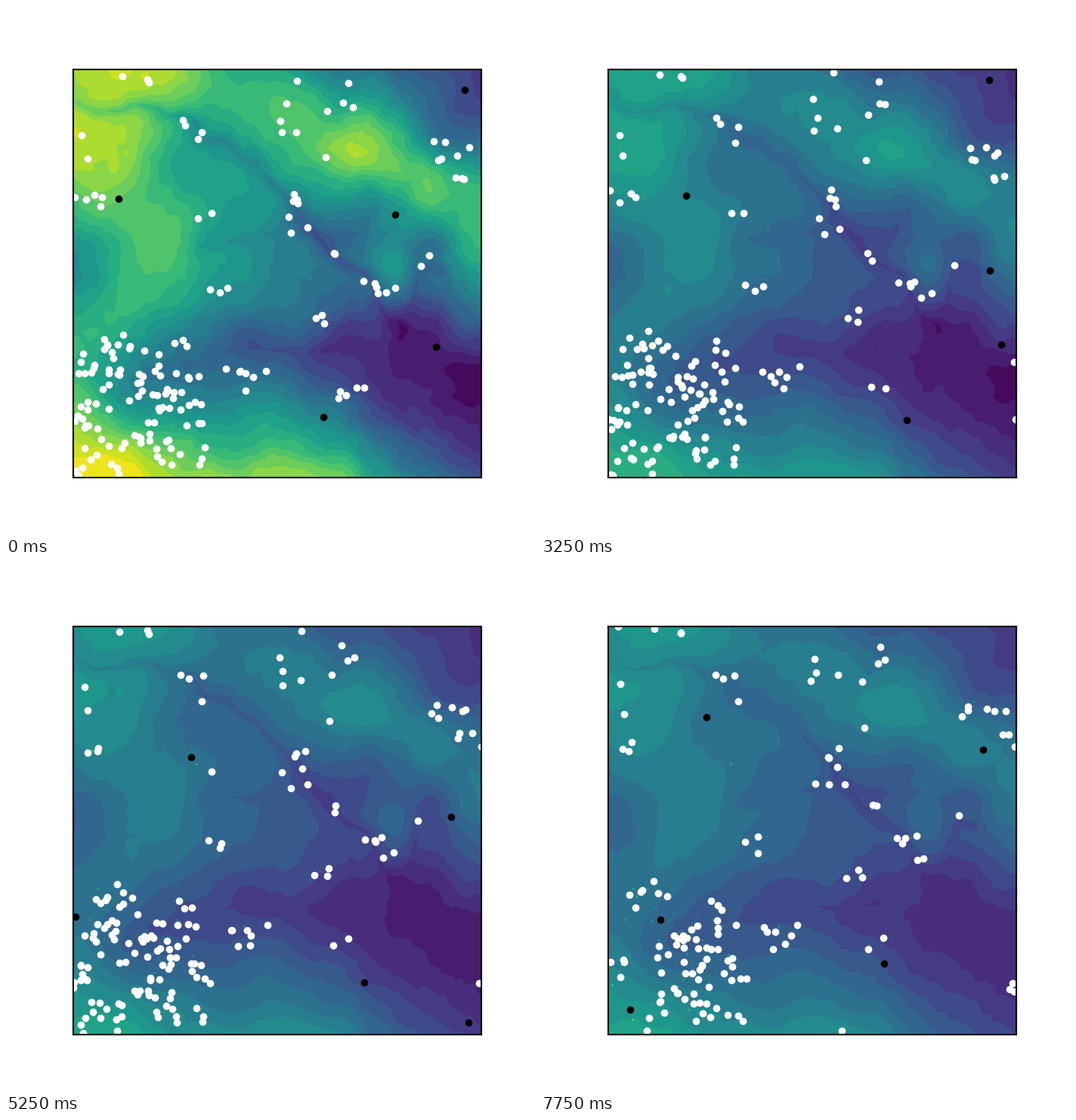
A matplotlib script that plays this animation: 700 px wide and 700 px high, repeating every 8 s.

```python
import numpy as np
import matplotlib.pyplot as plt
from matplotlib.animation import FuncAnimation

FRAMES, INTERVAL = 32, 250
STAGE, LEFT, TOP, SIDE = 700, 89, 84, 540
CELLS = 300
CELL = SIDE / CELLS
REACH = 24  # how near a hunter must come to eat
rng = np.random.default_rng(7)

# Spot heights of the open land: x, y, percent.
SPOTS = [
    (90, 86, 87), (222, 86, 86), (300, 92, 64), (362, 132, 72), (440, 95, 46),
    (628, 86, 19), (628, 160, 27), (580, 180, 40), (95, 190, 90), (150, 228, 81),
    (235, 200, 58), (415, 165, 73), (465, 188, 85), (520, 230, 71), (560, 235, 76),
    (320, 270, 54), (430, 275, 44), (472, 285, 37), (515, 345, 55), (562, 315, 38),
    (622, 320, 67), (600, 375, 43), (92, 335, 47), (200, 315, 73), (170, 385, 67),
    (115, 430, 66), (250, 405, 51), (380, 400, 38), (545, 410, 20), (540, 470, 8),
    (622, 500, 3), (150, 500, 52), (220, 470, 40), (330, 450, 31), (440, 450, 17),
    (350, 540, 54), (480, 540, 27), (570, 560, 17), (90, 580, 91), (170, 620, 97),
    (290, 590, 68), (443, 605, 68), (530, 605, 38), (628, 618, 22),
]

# Valleys: depth, width, path.
VALLEYS = [
    (.18, 14, [(90, 131), (160, 134), (240, 155), (300, 185), (335, 212),
               (370, 255), (430, 320), (485, 370), (520, 430)]),
    (.06, 16, [(190, 475), (300, 456), (440, 452)]),
    (.06, 9, [(270, 308), (320, 312), (385, 278)]),
    (.12, 13, [(575, 350), (548, 350), (540, 395)]),
]

# Herds: centre, half width, half height, head count.
HERDS = [
    (177, 528, 88, 93, 106), (115, 230, 25, 80, 7), (190, 96, 90, 6, 3),
    (256, 165, 26, 38, 4), (410, 150, 55, 58, 10), (587, 205, 28, 30, 9),
    (325, 268, 80, 38, 9), (281, 374, 20, 6, 3), (434, 328, 2, 2, 2),
    (503, 372, 30, 10, 6), (559, 337, 19, 10, 2), (417, 400, 12, 42, 3),
    (330, 495, 45, 22, 7), (464, 514, 24, 10, 5),
]

# Hunters run between a few points; the colour scale shifts at the same steps.
KEYS = [0, 4, 8, 18, 25, 31]
HUNTERS = [
    [(607, 111), (598, 98), (603, 104), (582, 93), (651, 34), (658, 51)],
    [(149, 255), (197, 262), (197, 251), (186, 251), (323, 264), (219, 204)],
    [(515, 276), (515, 276), (594, 355), (594, 345), (583, 323), (585, 247)],
    [(569, 451), (580, 451), (601, 451), (617, 445), (651, 499), (698, 472)],
    [(420, 544), (502, 524), (486, 530), (481, 567), (465, 540), (454, 530)],
]
GAIN = [1, 1, .70, .55, .50, .47]
BASE = [0, 0, .02, .03, .06, .09]

xs = np.linspace(LEFT, LEFT + SIDE, CELLS)
ys = np.linspace(TOP, TOP + SIDE, CELLS)
X, Y = np.meshgrid(xs, ys)


def ripple():
    """Rough texture of unit strength from waves in random directions."""
    total = np.zeros(X.shape)
    for length in np.geomspace(150, 14, 60):
        angle, phase = rng.uniform(0, 2 * np.pi, 2)
        along = X * np.cos(angle) + Y * np.sin(angle)
        total += length**.8 * np.cos(2 * np.pi * along / length + phase)
    return total / total.std()


def bend(d2):
    """Thin-plate kernel of a squared distance."""
    return d2 * np.log(d2 + 1e-9)


def surface(spots, x, y):
    """Thin-plate surface through the spot heights."""
    px, py, height = np.array(spots, float).T
    px, py, x, y = px / SIDE, py / SIDE, x / SIDE, y / SIDE
    n = len(px)
    plane = np.column_stack([np.ones(n), px, py])
    kernel = bend((px[:, None] - px)**2 + (py[:, None] - py)**2)
    system = np.block([[kernel, plane], [plane.T, np.zeros((3, 3))]])
    weights = np.linalg.solve(system, np.append(height / 100, np.zeros(3)))
    z = weights[n] + weights[n + 1] * x + weights[n + 2] * y
    for w, sx, sy in zip(weights, px, py):
        z += w * bend((x - sx)**2 + (y - sy)**2)
    return z


def carve(depth, width, path, x, y):
    """Sharp-bottomed valley along a polyline."""
    nearest = np.full(x.shape, np.inf)
    for (ax0, ay0), (ax1, ay1) in zip(path, path[1:]):
        dx, dy = ax1 - ax0, ay1 - ay0
        t = ((x - ax0) * dx + (y - ay0) * dy) / (dx**2 + dy**2)
        t = np.clip(t, 0, 1)
        nearest = np.minimum(nearest, np.hypot(x - ax0 - t * dx, y - ay0 - t * dy))
    return depth * np.exp(-nearest / width)


def wrap(points):
    corner = np.array([LEFT, TOP])
    return corner + (points - corner) % SIDE


def roam(x, y, dx, dy):
    """Random walk from somewhere in a herd, one cell at most per step."""
    start = (x, y) + rng.uniform(-1, 1, 2) * (dx, dy)
    moves = CELL * rng.integers(-1, 2, (FRAMES, 2))
    moves[0] = 0
    path = wrap(start + np.cumsum(moves, axis=0))
    gap = np.linalg.norm(hunters - path, axis=-1)
    eaten = np.logical_or.accumulate((gap < REACH).any(axis=0))
    eaten[0] = False
    path[eaten] = np.nan
    return path


warp_x, warp_y = X + 4 * ripple(), Y + 4 * ripple()
terrain = surface(SPOTS, warp_x, warp_y) + .01 * ripple()
for valley in VALLEYS:
    terrain -= carve(*valley, warp_x, warp_y)
terrain = np.clip(terrain, .04, .98)

steps = np.arange(FRAMES)
hunters = wrap(np.array([
    np.column_stack([np.interp(steps, KEYS, axis) for axis in zip(*track)])
    for track in HUNTERS]))
walkers = np.array([roam(*herd) for *herd, count in HERDS for _ in range(count)])

# Grazed cells: step, row, column, change of height.
grazed = []
for _ in range(190):
    born = int(6 + 25 * rng.random()**.7)
    spot = walkers[rng.integers(len(walkers)), born] + rng.normal(0, 4, 2)
    change = rng.choice([-.12, -.08, .12, .25])
    if not np.isnan(spot[0]):
        col, row = np.clip((spot - (LEFT, TOP)) / CELL, 0, CELLS - 1).astype(int)
        grazed.append((born, row, col, change))

fig = plt.figure(figsize=(7, 7), dpi=100, facecolor="white")
ax = fig.add_axes([LEFT / STAGE, 1 - (TOP + SIDE) / STAGE, SIDE / STAGE, SIDE / STAGE])
ax.set(xlim=(LEFT, LEFT + SIDE), ylim=(TOP + SIDE, TOP), xticks=[], yticks=[])
for spine in ax.spines.values():
    spine.set_linewidth(1.5)
prey_dots, = ax.plot([], [], "o", color="white", ms=6)
hunter_dots, = ax.plot([], [], "o", color="black", ms=6)


def draw(n):
    for old in list(ax.collections):
        old.remove()
    z = np.interp(n, KEYS, GAIN) * terrain + np.interp(n, KEYS, BASE)
    for born, row, col, change in grazed:
        if born <= n:
            z[row, col] += change
    ax.contourf(xs, ys, np.clip(z, .001, .999), levels=np.linspace(0, 1, 21),
                cmap="viridis", vmin=0, vmax=1)
    prey_dots.set_data(*walkers[:, n].T)
    hunter_dots.set_data(*hunters[:, n].T)
    return prey_dots, hunter_dots


anim = FuncAnimation(fig, draw, frames=FRAMES, interval=INTERVAL,
                     repeat=True, repeat_delay=0, blit=False)
plt.show()
```
